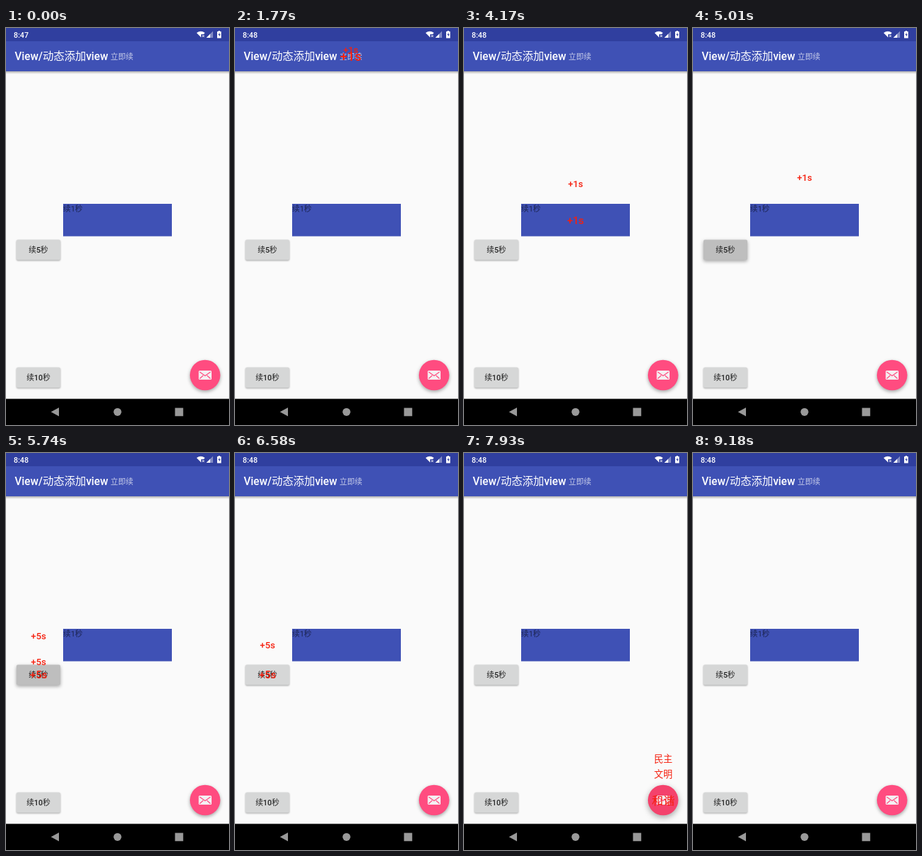
An HTML page for the animation above (9.4 s loop, 320x569 px).

```html
<!DOCTYPE html>
<html lang="zh">
<head>
<meta charset="utf-8">
<style>
html, body { margin: 0; width: 100%; height: 100%; overflow: hidden; background: #fafafa; }
svg { display: block; width: 100%; height: 100%; font: 10.9px Roboto, "Noto Sans CJK SC", "Noto Sans CJK", sans-serif; }
.medium { font-weight: 500; }
.mid { text-anchor: middle; }
#pops { font-size: 13.2px; fill: #f5200f; }
</style>
</head>
<body>
<svg viewBox="0 0 320 569">
  <defs>
    <linearGradient id="shade" x2="0" y2="1">
      <stop stop-opacity=".3"/>
      <stop offset="1" stop-opacity="0"/>
    </linearGradient>
  </defs>
  <rect width="320" height="569" fill="#fafafa"/>
  <rect y="62" width="320" height="4" fill="url(#shade)"/>
  <rect y="19" width="320" height="43" fill="#3f51b5"/>
  <rect width="320" height="19" fill="#303f9f"/>
  <rect y="531.5" width="320" height="38"/>

  <g fill="#fff">
    <text id="clock" class="medium" x="11" y="13.5">8:47</text>
    <path d="M273.5 7Q279.500 2.500 285.500 7L283.500 9H280V13.500Z"/>
    <path d="M281.500 10l3 3m0-3l-3 3" stroke="#fff"/>
    <path d="M297 4.500V14H287.500Z" opacity=".4"/>
    <path d="M293 8.500V14H287.500Z"/>
    <path d="M303 5h1.700v-1h2.400v1h1.700v9.500h-5.800z"/>
    <path d="M306.500 6.500l-2 3.500h1.300v2.500l2-3.500h-1.300z" fill="#303f9f"/>
    <text class="medium" x="12.500" y="46.300" font-size="15.57">View/动态添加view</text>
    <text x="150" y="45" opacity=".7">立即续</text>
  </g>

  <rect x="82" y="252" width="156" height="46.500" fill="#3f51b5"/>
  <text x="82" y="263" fill="#1d2553">续1秒</text>

  <g class="medium mid" fill="#212121">
    <rect id="five" x="15" y="303.500" width="63" height="29" rx="2"/>
    <text x="46.500" y="321.500">续5秒</text>
    <rect x="15" y="486.500" width="63" height="29" rx="2" fill="#d6d7d7" style="filter:drop-shadow(0 1px 1px #0005)"/>
    <text x="46.500" y="504.500">续10秒</text>
  </g>

  <circle id="fab" cx="285.700" cy="497.500" r="21.800"/>
  <rect x="276.500" y="491" width="18.500" height="13" rx="1.500" fill="#f4f0f2"/>
  <path d="M278 493l7.700 5.500 7.700-5.500M278 502.500l5-4.500m10.400 4.500l-5-4.500" fill="none" stroke="#ff4c80" stroke-width="1.200"/>

  <g fill="#999">
    <path d="M64.500 550.300L76 544v12.600Z"/>
    <circle cx="160" cy="550.300" r="5.600"/>
    <rect x="242.500" y="544.500" width="11.800" height="11.800"/>
  </g>
  <g id="pops" class="medium mid"></g>
</svg>
<script>
const LOOP = 9400, POP = 300, RISE = 500, HEIGHT = 62;
const $ = id => document.getElementById(id);

// Each group: centre, labels (repeated in turn), tap times in ms.
const groups = [
  { x: 166, y: 40, labels: ['+1s'], taps: [1350, 1680, 2020, 2360] },
  { x: 160, y: 275.5, labels: ['+1s'], taps: [3335, 3503, 3892, 4250] },
  { x: 46.7, y: 317.5, labels: ['+5s'], taps: [5045, 5257, 5470, 5770, 5970, 6305] },
  { x: 286, y: 498, labels: ['富强', '民主', '文明', '和谐', '自由', '平等'],
    taps: [6960, 7190, 7344, 7680, 7960, 8375] }
];

const pops = groups.flatMap(({ x, y, labels, taps }) => taps.map((start, i) => {
  const el = document.createElementNS('http://www.w3.org/2000/svg', 'text');
  el.textContent = labels[i % labels.length];
  el.setAttribute('dy', '.36em');
  $('pops').append(el);
  return { el, x, y, start };
}));

// A label swells in place, then rises with eased ends and vanishes.
function drawPop({ el, x, y, start }, t) {
  const age = t - start;
  const shown = age >= 0 && age < POP + RISE;
  el.style.display = shown ? '' : 'none';
  if (!shown) return;
  const swell = Math.min(1, age / POP);
  const climb = Math.max(0, (age - POP) / RISE);
  const rise = HEIGHT * (1 - Math.cos(Math.PI * climb)) / 2;
  const scale = 1 + .5 * Math.sin(Math.PI * swell);
  el.setAttribute('transform', `translate(${x} ${y - rise}) scale(${scale})`);
}

// 1 while held, easing in before the tap and out after it.
function pressed(taps, t) {
  return Math.max(0, ...taps.map(tap => Math.min(1, (t - tap + 130) / 80, (tap + 110 - t) / 80)));
}

function mix(a, b, k) {
  return `rgb(${a.map((v, i) => v + (b[i] - v) * k)})`;
}

function raise(el, k, rest, held, depth) {
  el.style.fill = mix(rest, held, k);
  el.style.filter = `drop-shadow(0 ${depth + k}px ${depth + 1.5 * k}px rgba(0,0,0,.35))`;
}

function draw(now) {
  const t = now % LOOP;
  $('clock').textContent = t < 1360 ? '8:47' : '8:48';
  raise($('five'), pressed(groups[2].taps, t), [214, 215, 215], [190, 190, 190], 1);
  raise($('fab'), pressed(groups[3].taps, t), [255, 76, 128], [244, 66, 108], 2.5);
  pops.forEach(p => drawPop(p, t));
}

const begin = performance.now();
function frame() {
  draw(performance.now() - begin);
  requestAnimationFrame(frame);
}
frame();
</script>
</body>
</html>
```
